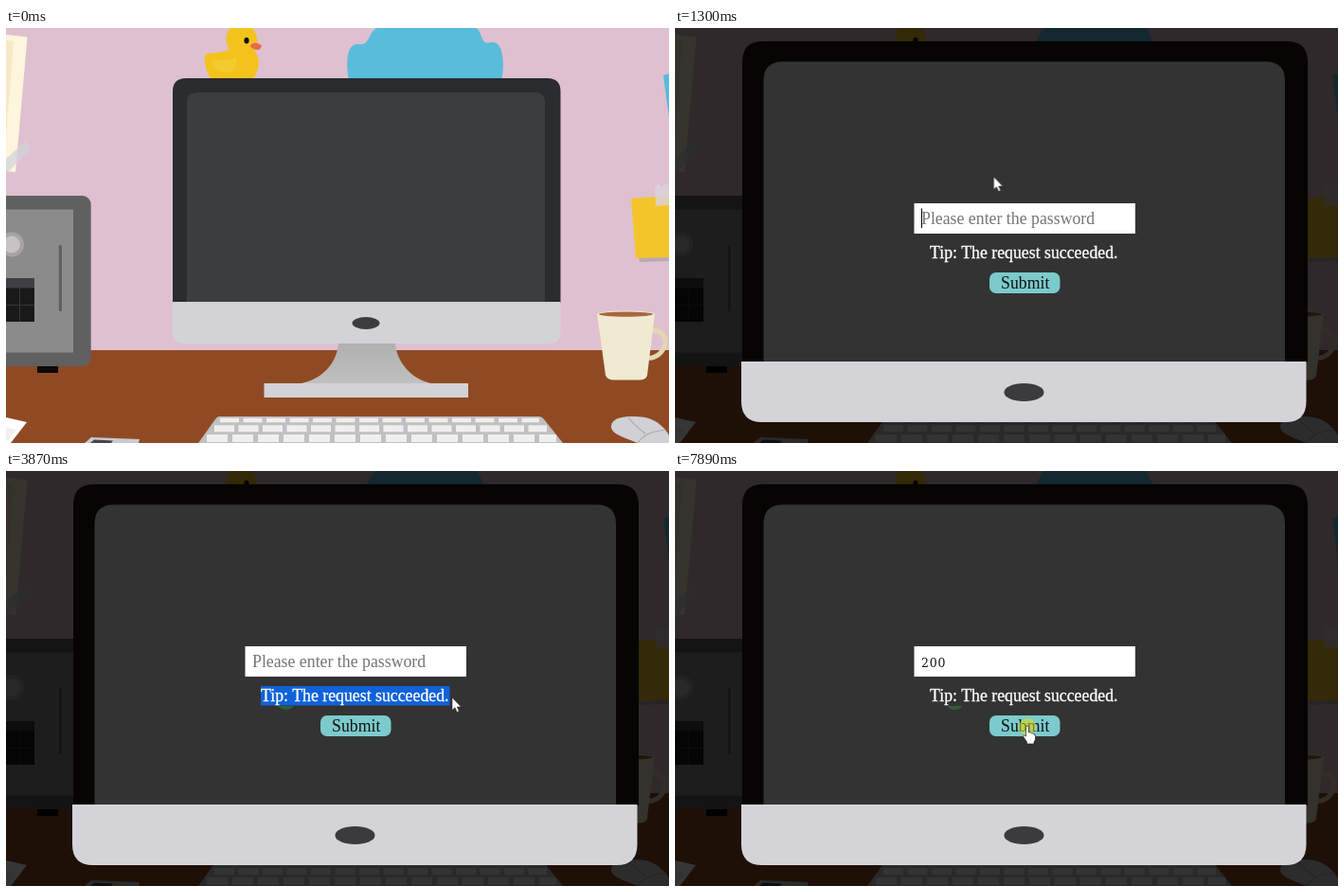
Animation of 700x438 px, one loop 8000 ms. Source, as an HTML page:

```html
<!DOCTYPE html>
<html lang="en">
<head>
<meta charset="utf-8">
<title>Desk password puzzle</title>
<style>
html, body { margin: 0; width: 100%; height: 100%; overflow: hidden; background: #dfc0d0; }
svg { display: block; width: 700px; height: 438px; }
text { font: 17.8px "Liberation Serif", "Times New Roman", serif; }
.tip { fill: #fff; stroke: #fff; stroke-width: .3px; }
.typed { font: 12.5px "DejaVu Serif", serif; letter-spacing: .8px; }

/* Every part shares one 8 s clock; 1% is 80 ms. */
.anim { animation: 8s step-end infinite; }
.monitor { animation-name: grow; transform-origin: 380.5px 220.5px; }
.modal { animation-name: open; }
.hint { animation-name: hint; }
.d1 { animation-name: first; }
.d2 { animation-name: second; }
.d3 { animation-name: third; }
.caret { animation-name: caret; }
.select { animation-name: select; }
.smudge { animation-name: smudge; }
.cursor { animation-name: move; }
.dot { animation-name: click; }
.lens { animation-name: lens; }
.arrow { animation-name: arrow; }
.beam { animation-name: beam; }
.hand { animation-name: hand; }

@keyframes grow {
  0% { transform: none; filter: drop-shadow(0 0 0 rgba(0,0,0,0)); }
  5.5% { transform: scale(1); filter: drop-shadow(0 0 0 rgba(0,0,0,0)); animation-timing-function: ease; }
  10.25%, 100% { transform: scale(1.05); filter: drop-shadow(4px 4px 4px rgba(0,0,0,.6)); }
}
@keyframes open { 0% { opacity: 0 } 16.25%, 100% { opacity: 1 } }
@keyframes hint { 0% { opacity: 1 } 72.25%, 100% { opacity: 0 } }
@keyframes first { 0% { fill: transparent } 72.25%, 100% { fill: #111 } }
@keyframes second { 0% { fill: transparent } 78.75%, 100% { fill: #111 } }
@keyframes third { 0% { fill: transparent } 80.875%, 100% { fill: #111 } }
@keyframes caret {
  0% { opacity: 1; transform: none; }
  23.125% { opacity: 0 }
  30% { opacity: 1 }
  36.75% { opacity: 0 }
  64.25% { opacity: 1 }
  71.125% { opacity: 0 }
  72.25% { opacity: 1; transform: translateX(8px); }
  78.75% { transform: translateX(16px); }
  80.875% { opacity: 1; transform: translateX(25px); }
  87.75% { opacity: 0 }
  94.5% { opacity: 1 }
  98.625%, 100% { opacity: 0; transform: translateX(25px); }
}
@keyframes select {
  0% { width: 0 }
  39% { width: 14px }
  39.75% { width: 71px }
  46.5% { width: 199.5px }
  59.25%, 100% { width: 0 }
}
@keyframes smudge { 0% { opacity: 0 } 39.75%, 100% { opacity: 1 } }
@keyframes move {
  0% { opacity: 0; transform: translate(565px, 398px); }
  5.5% { opacity: 1; transform: translate(565px, 398px); }
  6.45% { transform: translate(522px, 345px); }
  7.375% { transform: translate(459px, 291px); animation-timing-function: steps(3); }
  10.25% { transform: translate(336.5px, 157px); }
  23.125% { transform: translate(330px, 164px); animation-timing-function: steps(10); }
  32.75% { transform: translate(269px, 235px); }
  33.875% { transform: translate(268px, 235px); }
  36.75% { transform: translate(267.5px, 235.5px); }
  39% { transform: translate(295px, 243px); }
  39.75% { transform: translate(369px, 247.5px); }
  40.75% { transform: translate(412px, 246px); animation-timing-function: steps(4); }
  44.625% { transform: translate(470px, 241px); }
  46.5% { transform: translate(471px, 239px); }
  53.375% { transform: translate(467px, 237px); }
  54.375% { transform: translate(474px, 239px); }
  59.25% { transform: translate(347px, 198px); }
  72.25% { opacity: 0 }
  91.5% { opacity: 1; transform: translate(347px, 200px); animation-timing-function: steps(5); }
  96.875%, 100% { opacity: 1; transform: translate(372px, 270px); }
}
@keyframes click {
  0% { opacity: 0 }
  14.25% { opacity: 1 }
  16.25% { opacity: 0 }
  36.75% { opacity: 1 }
  48.375% { opacity: 0 }
  53.375% { opacity: 1 }
  54.375% { opacity: 0 }
  98.625%, 100% { opacity: 1 }
}
@keyframes lens { 0% { opacity: 1 } 16.25%, 100% { opacity: 0 } }
@keyframes arrow {
  0% { opacity: 0 }
  16.25% { opacity: 1 }
  59.25% { opacity: 0 }
  93.6% { opacity: 1 }
  95.7%, 100% { opacity: 0 }
}
@keyframes beam { 0% { opacity: 0 } 59.25% { opacity: 1 } 93.6%, 100% { opacity: 0 } }
@keyframes hand { 0% { opacity: 0 } 95.7%, 100% { opacity: 1 } }
</style>
</head>
<body>
<svg viewBox="0 0 700 438" xmlns="http://www.w3.org/2000/svg">
  <defs>
    <linearGradient id="neck" x2="0" y2="1">
      <stop stop-color="#afafaf"/><stop offset="1" stop-color="#c0c0c0"/>
    </linearGradient>
  </defs>

  <rect width="700" height="438" fill="#dfc0d0"/>
  <rect y="340" width="700" height="98" fill="#904a23"/>

  <!-- wall papers -->
  <path d="M0 7L22.500 9.500L10 152L0 151Z" fill="#fdf5dc"/>
  <path d="M0 13L8 14L0 116Z" fill="#f8e8c6"/>
  <path d="M0 138L20 120L22 123L26 124L24 130L3 151L0 151Z" fill="#d3d3d8" opacity=".75"/>
  <path d="M694 50L700 48V95Z" fill="#5ab9da"/>
  <path d="M668 242L700 239V246L669 247Z" fill="#b9aab3"/>
  <path d="M660 180L700 177V242L665 243Z" fill="#f4c52b"/>
  <path d="M685 168L689 164L692 168L697 164L700 167V187L686 188Z" fill="#d9d3dc" opacity=".8"/>

  <!-- safe -->
  <rect x="33" y="355" width="22" height="9" fill="#0c0808"/>
  <rect x="-20" y="177" width="109.700" height="180" rx="9" fill="#606061"/>
  <rect x="-20" y="191.500" width="91" height="151" fill="#8b8b8b"/>
  <circle cx="6" cy="228.500" r="13" fill="#a7a3a2"/>
  <circle cx="6" cy="228.500" r="9" fill="#c5c3c3"/>
  <rect x="55.800" y="229" width="3.200" height="70" rx="1.600" fill="#5f5f61"/>
  <rect y="264" width="30" height="46" fill="#19191a"/>
  <rect y="264" width="30" height="10.500" fill="#3f3f45"/>
  <path d="M0 292.500H30M14.500 275V310" stroke="#363638" fill="none"/>

  <!-- mug -->
  <g transform="translate(0 .6)">
    <path d="M682 319C701 316 701 345 679 348" fill="none" stroke="#e3d7b2" stroke-width="5"/>
    <path d="M624 301H685L677 366Q676 371 668 371H642Q635 371 633 366Z" fill="#f0ead0"/>
    <ellipse cx="654.500" cy="301.500" rx="30.500" ry="3.500" fill="#f0ead0"/>
    <ellipse cx="654.500" cy="301.500" rx="28.500" ry="2.600" fill="#a5673f"/>
  </g>

  <!-- things on the desk -->
  <path d="M0 411L22 416L5 438H0Z" fill="#fff"/>
  <path d="M0 421L11 424L2 436L0 435Z" fill="#f0f0f0"/>
  <path d="M83 438L90 432L141 434L140 438Z" fill="#cbcad0"/>
  <path d="M89 438L93 434.500L113 435.500L111 438Z" fill="#46444c"/>
  <path d="M225 410H563Q566 410 568 413L588 438H203L221 413Q223 410 225 410Z" fill="#c0bfc2"/>
  <g stroke="#efeff0" fill="none">
    <path d="M226 414H563" stroke-width="4.500" stroke-dasharray="20 4.500"/>
    <path d="M220 422.800H571" stroke-width="7" stroke-dasharray="21 4.500"/>
    <path d="M212 433H581" stroke-width="8" stroke-dasharray="22 5"/>
  </g>
  <path d="M639 420C640 409 660 409 675 411C689 414 697 424 700 430V438H667C652 432 638 428 639 420Z" fill="#d1d0d5"/>
  <path d="M667 438Q674 426 697 424M675 428Q664 420 657 411" fill="none" stroke="#a9a8ad" stroke-width="1.200"/>

  <!-- toys -->
  <path d="M210 29C211 25 227 28 236 22C231 16 231 5 237 0H260C265 6 268 14 262 23C269 32 268 45 260 55H217C212 47 209 37 210 29Z" fill="#f3c31d"/>
  <path d="M218 33Q231 37 243 31Q246 46 231 47Q219 46 218 33Z" fill="#f3cb30"/>
  <ellipse cx="254" cy="13.300" rx="2.600" ry="3.200" fill="#111"/>
  <path d="M258 18Q264 13.500 270 18.500L268 22.500Q262 24 258 19.500Z" fill="#e8694a"/>
  <path d="M362 56C358 32 361 17 371 17C385 19 381 7 391 0H497C504 7 501 19 513 15C525 14 527 37 523 56Z" fill="#5abcdb"/>

  <!-- monitor -->
  <g class="anim monitor">
    <path d="M351 332H411C412 352 428 372 452 375.500H308C335 372 350 352 351 332Z" fill="url(#neck)"/>
    <rect x="272.500" y="375" width="215.500" height="15" fill="#d3d3d7"/>
    <path d="M176 290V67Q176 53 190 53H571.500Q585.500 53 585.500 67V290Z" fill="#2a2c30"/>
    <path d="M191 290V79Q191 68 202 68H558Q569 68 569 79V290Z" fill="#3c3d41"/>
    <path d="M176 289H585.500V321Q585.500 333 573.500 333H188Q176 333 176 321Z" fill="#d3d3d7"/>
    <ellipse cx="380" cy="311.500" rx="14.500" ry="6.500" fill="#3b3c40"/>
  </g>

  <!-- login view -->
  <g class="anim modal">
    <rect width="700" height="438" opacity=".79"/>
    <path d="M71 353V36Q71 14 93 14H646Q668 14 668 36V353Z" fill="#060504"/>
    <path d="M93.500 353V56Q93.500 35.500 114 35.500H623.500Q644 35.500 644 56V353Z" fill="#333"/>
    <path d="M70 352H666.500V394Q666.500 416 644.500 416H92Q70 416 70 394Z" fill="#d3d3d8"/>
    <ellipse cx="368.500" cy="384.500" rx="21" ry="9.500" fill="#3a3a3f"/>

    <rect x="252.500" y="185" width="233.500" height="32" fill="#fff"/>
    <text class="anim hint" x="260" y="206.500" fill="#757575">Please enter the password</text>
    <text class="typed" x="260" y="206.500"><tspan class="anim d1">2</tspan><tspan class="anim d2">0</tspan><tspan class="anim d3">0</tspan></text>
    <rect class="anim caret" x="260" y="190.500" width="1" height="20.500"/>

    <path class="anim smudge" d="M287.500 248H303.500Q301 252 295.500 252T287.500 248Z" fill="#2f5f36"/>
    <rect class="anim select" x="269" y="227" height="20.500" fill="#0f62d8"/>
    <text class="tip" x="269" y="243">Tip: The request succeeded.</text>

    <rect x="332" y="258" width="74.500" height="22" rx="7" fill="#7ccacd"/>
    <text x="344" y="274.500" fill="#111">Submit</text>
  </g>

  <!-- pointer -->
  <g class="anim cursor">
    <circle class="anim dot" r="9" fill="rgb(225,220,20)" fill-opacity=".57"/>
    <g class="anim lens" fill="none">
      <path d="M25 22.500L33 27.500" stroke="#b39c98" stroke-width="4"/>
      <path d="M31.500 26.500L43.500 33" stroke="#354150" stroke-width="5"/>
      <circle cx="13.500" cy="14" r="12.800" fill="#c5dde2" stroke="#54565c" stroke-width="1.800"/>
    </g>
    <path class="anim arrow" d="M0 0V13.500L3 10.700L5.200 15.500L7.400 14.500L5.300 10H9.500Z" fill="#fff" stroke="#222" stroke-width=".6"/>
    <path class="anim beam" d="M-3 -5.500H-1L0 -5L1 -5.500H3M0 -5V5M-3 5.500H-1L0 5L1 5.500H3" fill="none" stroke="#222"/>
    <path class="anim hand" d="M-1.500 1Q-1.500 -1 0 -1T1.500 1V6Q4 5 4.500 7Q6.500 6 7 8Q8.500 7.500 8.500 10V13Q8 15 7 16V18H-.5V16L-4.500 10Q-4 7.500 -1.500 10Z" fill="#fff" stroke="#222" stroke-width=".7"/>
  </g>
</svg>
</body>
</html>
```
